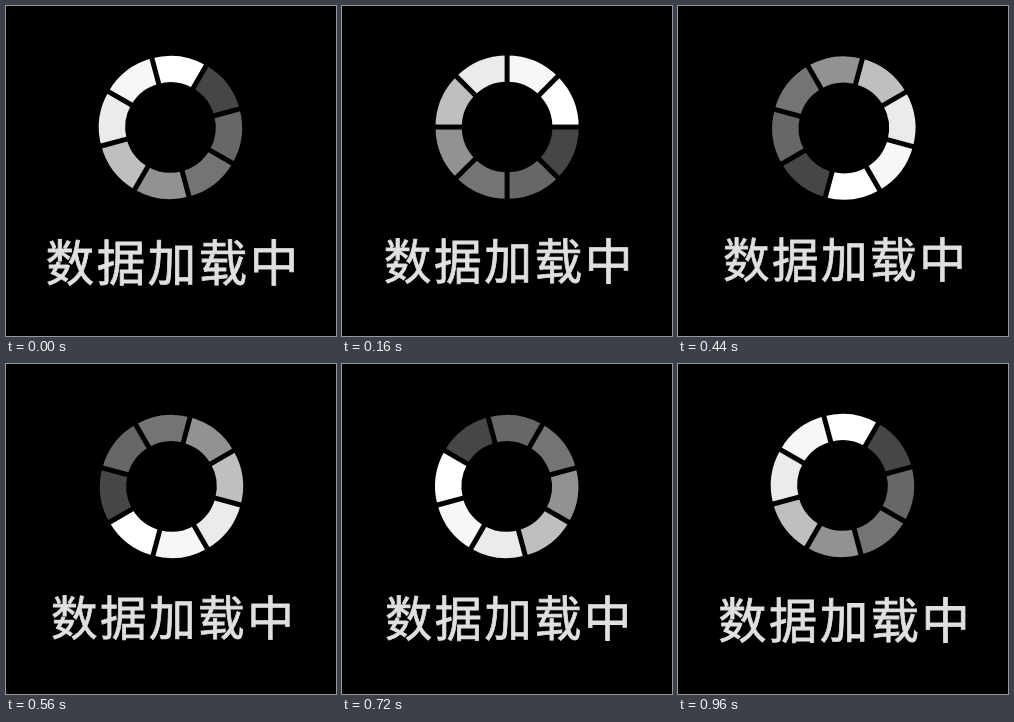
An HTML page that plays this animation: 330 by 330 pixels, repeating every 1 s.

```html
<!DOCTYPE html>
<html lang="zh-CN">
<head>
<meta charset="utf-8">
<title>数据加载中</title>
<style>
  html, body { margin: 0; width: 100%; height: 100%; overflow: hidden; background: #000; }
  svg { display: block; width: 100vw; height: 100vh; }
  text {
    font: 400 48.4px "Noto Sans CJK SC", "Noto Sans CJK", sans-serif;
    letter-spacing: 2.6px;
    fill: #e0e0e0; stroke: #e0e0e0; stroke-width: 0.8px;
  }
</style>
</head>
<body>
<svg viewBox="0 0 330 330">
  <g id="ring"></g>
  <g id="label"><text x="39.8" y="274.8">数据加载中</text></g>
</svg>
<script>
const LOOP = 1000, STEP = 40, TURN = 15;
const OUTER = 71.6, INNER = 45.3, GAP = 5;
const SHADES = ['#fff', '#f7f7f7', '#ebebeb', '#bfbfbf', '#929292', '#747474', '#676767', '#464646'];
const ring = document.getElementById('ring');
const label = document.getElementById('label');

function add(name, attrs) {
  const node = document.createElementNS('http://www.w3.org/2000/svg', name);
  for (const key in attrs) node.setAttribute(key, attrs[key]);
  ring.appendChild(node);
}

// Angles run clockwise from straight up.
function point(radius, degrees) {
  const a = degrees * Math.PI / 180;
  return `${radius * Math.sin(a)} ${-radius * Math.cos(a)}`;
}

SHADES.forEach((fill, i) => {
  const end = -45 * i, start = end - 45;
  add('path', {
    fill,
    d: `M${point(OUTER, start)}A${OUTER} ${OUTER} 0 0 1 ${point(OUTER, end)}` +
       `L${point(INNER, end)}A${INNER} ${INNER} 0 0 0 ${point(INNER, start)}Z`
  });
});
SHADES.forEach((_, i) => add('path', {
  d: `M${point(INNER - 2, 45 * i)}L${point(OUTER + 2, 45 * i)}`,
  stroke: '#000', 'stroke-width': GAP
}));

function draw(now) {
  const step = Math.floor((now % LOOP) / STEP + 1e-6);
  const phase = step * STEP / LOOP;
  const scale = 1 - 0.043 * (1 - Math.abs(1 - 2 * phase));
  // The ring turns about a point slightly off its centre.
  ring.setAttribute('transform',
    `translate(165.1 121.8) rotate(${30 + TURN * step}) translate(-0.75 0)`);
  label.setAttribute('transform',
    `translate(176 165) scale(${scale}) translate(-176 -165)`);
}

const begin = performance.now();
function tick() {
  draw(performance.now() - begin);
  requestAnimationFrame(tick);
}
tick();
</script>
</body>
</html>
```
